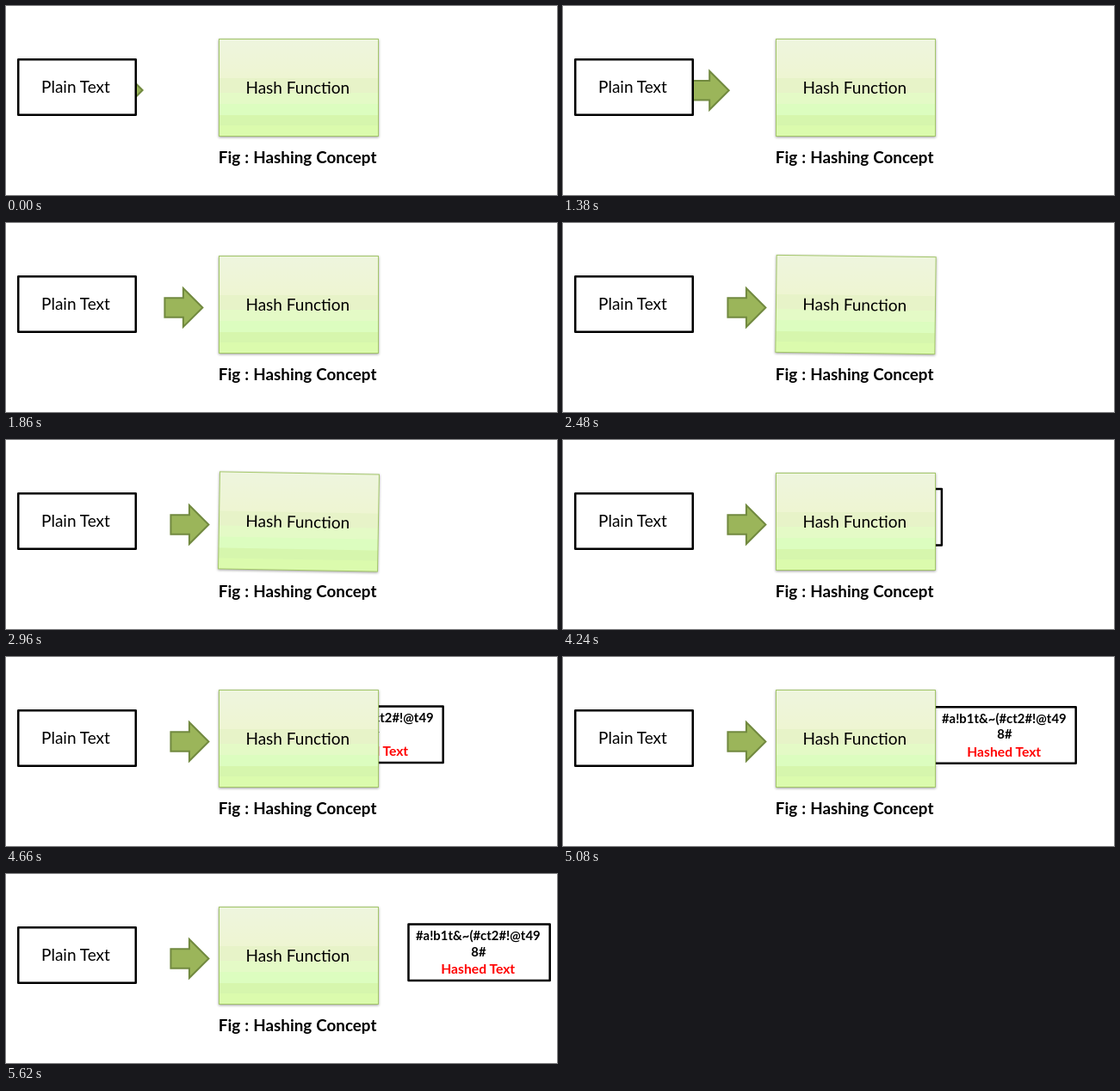
Write an HTML page that moves like this. It is 640 by 220 pixels and loops after 5.88 s.

```html
<!DOCTYPE html>
<html lang="en">
<head>
<meta charset="utf-8">
<title>Hashing Concept</title>
<style>
  html, body { margin: 0; width: 100%; height: 100%; overflow: hidden; background: #fff; }
  svg { display: block; width: 640px; height: 220px; }
  text { font-family: Lato, sans-serif; text-anchor: middle; }
  .label { font-size: 19px; }
  .caption { font-size: 18.8px; font-weight: 700; word-spacing: .6px; }
  .code { font-size: 14.9px; font-weight: 700; }
  .note { font-size: 15.7px; font-weight: 700; fill: #f00; }
  .frame { fill: #fff; stroke: #000; stroke-width: 2.5; stroke-linejoin: round; }
  #hash rect { stroke: #a3c669; filter: drop-shadow(0 1.8px 1.4px rgba(0, 0, 0, .38)); }
</style>
</head>
<body>
<svg viewBox="0 0 640 220">
  <defs>
    <linearGradient id="bands" x1="0" y1="0" x2="0" y2="1">
      <stop offset="0" stop-color="#eef5de"/>
      <stop offset=".4" stop-color="#eef5d2"/>
      <stop offset=".4" stop-color="#e7f3c8"/>
      <stop offset=".553" stop-color="#e7f3c8"/>
      <stop offset=".553" stop-color="#e4fac6"/>
      <stop offset=".668" stop-color="#e4fac6"/>
      <stop offset=".668" stop-color="#dcfdbf"/>
      <stop offset=".783" stop-color="#dcfdbf"/>
      <stop offset=".783" stop-color="#d6f6ad"/>
      <stop offset=".889" stop-color="#d6f6ad"/>
      <stop offset=".889" stop-color="#dbfbad"/>
      <stop offset="1" stop-color="#dbfbad"/>
    </linearGradient>
  </defs>

  <path id="arrow" fill="#9bb55a" stroke="#71893f" stroke-width="2"
    d="M-44 -11.25H-22.5V-22.5L0 0L-22.5 22.5V11.25H-44Z"/>

  <rect class="frame" x="14.25" y="62.25" width="136.5" height="64.5"/>
  <text class="label" x="81" y="101.3">Plain Text</text>

  <g id="result">
    <rect class="frame" x="-165.5" y="58.5" width="164.2" height="65.5"/>
    <text class="code" x="-84.7" y="77">#a!b1t&amp;~(#ct2#!@t49</text>
    <text class="code" x="-84" y="95.7">8#</text>
    <text class="note" x="-84.8" y="116">Hashed Text</text>
  </g>

  <g id="hash">
    <rect x="247.5" y="38.5" width="185" height="113" fill="url(#bands)"/>
    <text class="label" x="338.8" y="102">Hash Function</text>
  </g>
  <text class="caption" x="338.6" y="183.3">Fig : Hashing Concept</text>
</svg>
<script>
const LOOP = 5880, TICK = 60;
const [arrow, hash, result] = ['arrow', 'hash', 'result'].map(id => document.getElementById(id));

// Knots: [tick, x, speed per tick]
const arrowPath = [[0, 158.6, 0], [10, 179.2, 3.9], [13, 192.7, 4.8], [20, 225.5, 3.2], [28, 235.4, 0]];
const resultPath = [[0, 431.8, 3.6], [9, 509, 13.6], [10, 522.8, 14], [16, 597, 9.6], [20, 625, 4], [25, 633, 0]];
// Rocking: [ms, degrees]
const rock = [[0, 0], [100, 2], [200, 2], [400, -2], [600, 2], [800, -2], [1000, 0]];

const ticks = (t, start, max) => Math.max(0, Math.min(max, Math.floor((t - start) / TICK) + 1));

function segment(knots, s) {
  let i = 1;
  while (i < knots.length - 1 && s > knots[i][0]) i++;
  const a = knots[i - 1], b = knots[i], span = b[0] - a[0];
  return { a, b, span, u: (s - a[0]) / span };
}

function glide(knots, s) {
  const { a, b, span, u } = segment(knots, s), v = 1 - u;
  return a[1] * v * v * (1 + 2 * u) + b[1] * u * u * (3 - 2 * u)
    + span * u * v * (a[2] * v - b[2] * u);
}

function angle(step) {
  if (!step) return 0;
  const { a, b, u } = segment(rock, 35 + (step - 1) * 965 / 15);
  return a[1] + (b[1] - a[1]) * u;
}

function draw(t) {
  const x = glide(arrowPath, ticks(t, 660, 28));
  arrow.setAttribute('transform', `translate(${x} ${98.5 - (235.4 - x) / 150})`);

  hash.setAttribute('transform', `rotate(${angle(ticks(t, 2480, 16))} 340 95)`);

  const step = ticks(t, 4180, 25), edge = glide(resultPath, step);
  result.setAttribute('visibility', step ? 'visible' : 'hidden');
  result.setAttribute('transform', `translate(${edge} ${(edge - 633) / 134})`);
}

const begin = performance.now();
function loop() {
  draw((performance.now() - begin) % LOOP);
  requestAnimationFrame(loop);
}
loop();
</script>
</body>
</html>
```
